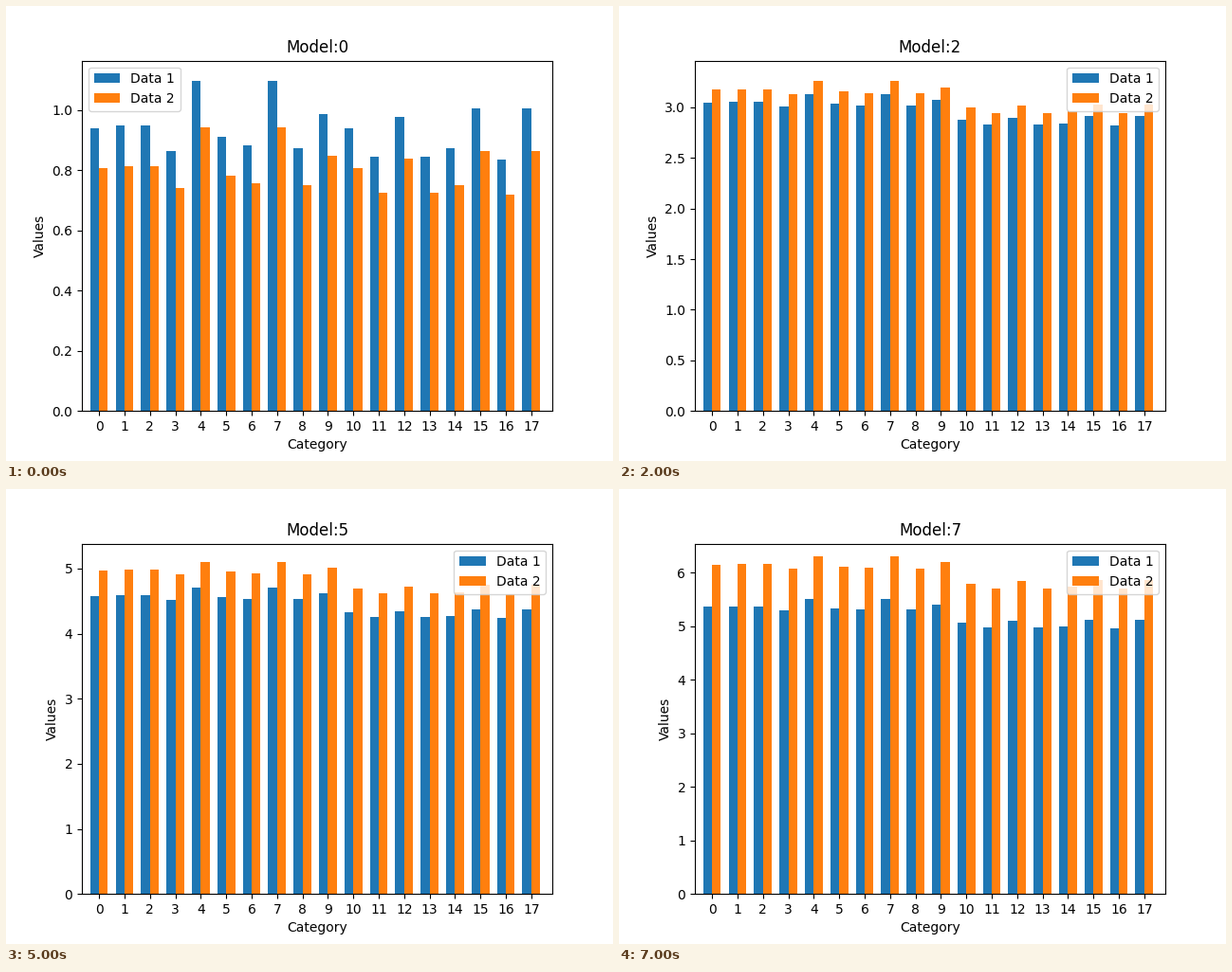
Animation of 640 by 480 pixels, one loop 8000 ms. Source, as a matplotlib script:

```python
import matplotlib.pyplot as plt
import numpy as np
from matplotlib.animation import FuncAnimation

plt.rcParams["font.family"] = "DejaVu Sans"

MODELS = 8
WIDTH = 0.35
x = np.arange(18)

# Key models; levels in between are interpolated.
keys = [0, 1, 2, 3, 5, 7]
peak = [1.108, 2.318, 3.297, 4.195, 5.126, 6.232]
mean_1 = [0.938, 2.212, 2.973, 3.657, 4.464, 5.229]
mean_2 = [0.806, 2.161, 3.093, 3.962, 4.846, 5.993]

# Deviation of each category from the mean, in percent.
opening = np.array([0, 1, 1, -8, 17, -3, -6, 17, -7,
                    5, 0, -10, 4, -10, -7, 7, -11, 7]) / 100
step = np.where(x < 10, 0.026, -0.032)


def level(points, model):
    return np.interp(model, keys, points)


def profile(model):
    """The opening spread fades and settles into a drop after category 9."""
    fade = np.exp(-2.5 * model)
    settled = 0.16 * opening + step
    return 1 + fade * opening + (1 - fade) * settled


fig, ax = plt.subplots(figsize=(6.4, 4.8), dpi=100)


def draw(model):
    shape = profile(model)
    ax.clear()
    ax.bar(x, level(mean_1, model) * shape, WIDTH, color="#1f77b4", label="Data 1")
    ax.bar(x + WIDTH, level(mean_2, model) * shape, WIDTH, color="#ff7f0e", label="Data 2")
    ax.set_xlim(-0.5, 18)
    ax.set_ylim(0, 1.05 * level(peak, model))
    ax.set_xticks(x + WIDTH / 2, [str(i) for i in x])
    ax.set_xlabel("Category")
    ax.set_ylabel("Values")
    ax.set_title(f"Model:{model}")
    ax.legend(loc="upper left" if model == 0 else "upper right")
    return []


anim = FuncAnimation(fig, draw, frames=MODELS, init_func=lambda: draw(0),
                     interval=1000, repeat=True, repeat_delay=0)
plt.show()
```
